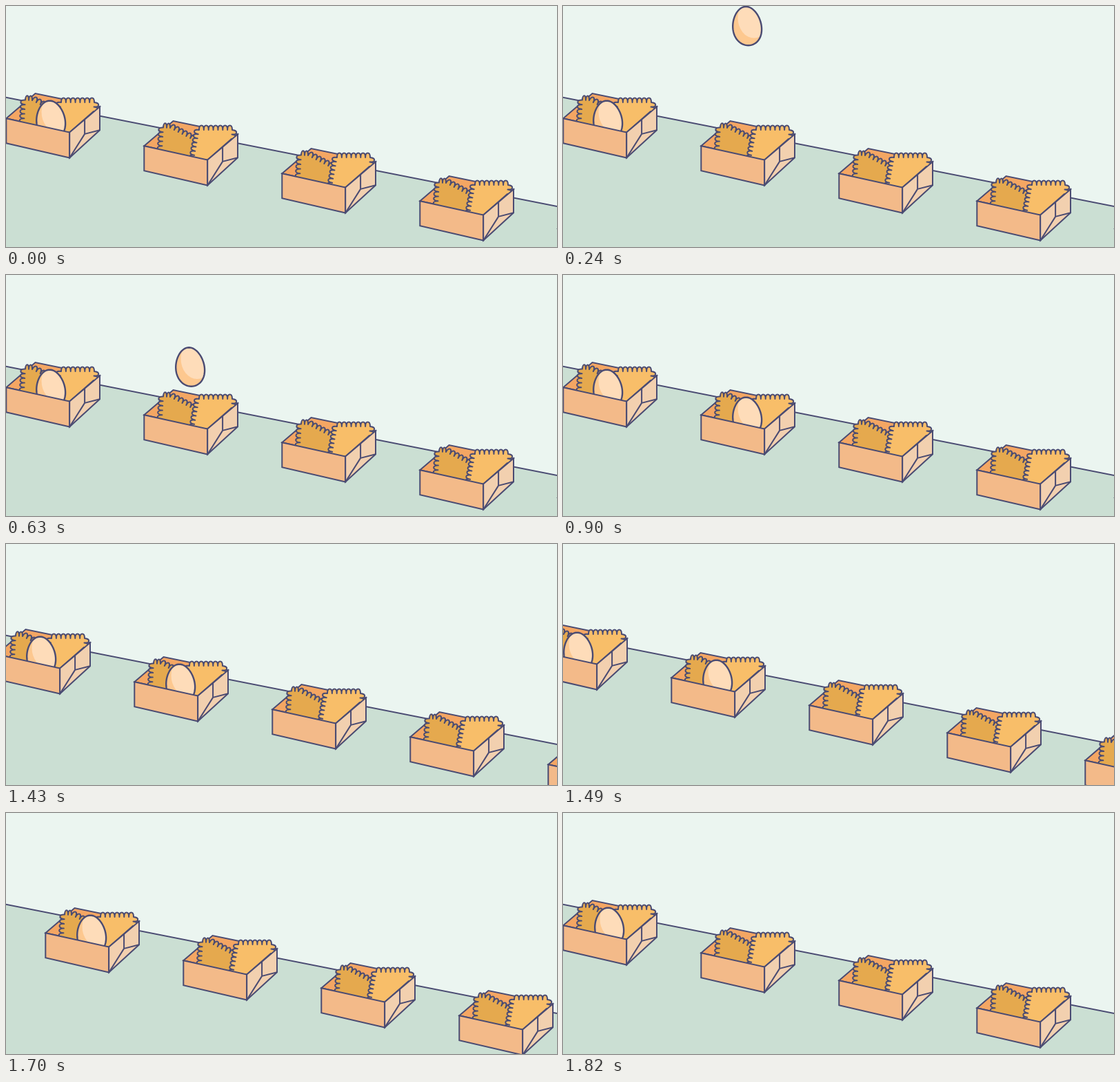
Animation, 799 px wide and 350 px high, one loop 1.85 s. Source, as an HTML page with a canvas:

```html
<!DOCTYPE html>
<html lang="en">
<head>
<meta charset="utf-8">
<title>Egg packing line</title>
<style>
  html, body { margin: 0; width: 100%; height: 100%; overflow: hidden; background: #ebf5f0; }
  canvas { display: block; }
</style>
</head>
<body>
<canvas id="stage" width="799" height="350"></canvas>
<script>
const ctx = document.getElementById('stage').getContext('2d');
const INK = '#4a4b72';
const LOOP = 1850, STEP = 30;
const FALL_STEPS = 30, FALL_HEIGHT = 241;
const SLIDE_START = 1400, SLIDE_STEPS = 14;
const PITCH_X = 200, PITCH_Y = 40;
const REST_Y = 165.8;   // egg centre inside a box
const BUMP = 6.5;       // size of one paper scallop

const polygon = (...points) =>
  new Path2D('M' + points.map(p => p.join()).join('L') + 'Z');

const below = ([x, y], drop) => [x, y + drop];

// Paper sheet with scallops along all edges but the two that meet at the last point.
function ruffle(points, corner) {
  const path = new Path2D();
  path.moveTo(...points[0]);
  for (let i = 1; i < points.length; i++) {
    let [x, y] = points[i - 1];
    const spanX = points[i][0] - x, spanY = points[i][1] - y;
    const length = Math.hypot(spanX, spanY);
    const count = Math.round(length / BUMP);
    const dx = spanX / count, dy = spanY / count;
    const outX = spanY / length * BUMP * 1.33, outY = -spanX / length * BUMP * 1.33;
    for (let n = 0; n < count; n++, x += dx, y += dy) {
      path.bezierCurveTo(x + outX, y + outY, x + outX + dx, y + outY + dy, x + dx, y + dy);
    }
  }
  path.lineTo(...corner);
  path.closePath();
  return path;
}

// An ellipse that narrows towards the top and leans slightly.
function eggShape() {
  const points = [];
  for (let a = 0; a < 2 * Math.PI; a += Math.PI / 30) {
    const y = -28.2 * Math.cos(a);
    points.push([20.8 * Math.sin(a) * (1 - 0.1 * Math.cos(a)) + 0.06 * y, y]);
  }
  return polygon(...points);
}

const left = [0.3, 163.3], back = [42.5, 127], right = [136, 146.3], near = [92.2, 183.5];
const nearFoot = below(near, 37), rightFoot = below(right, 34);
const foldTop = [(near[0] + right[0]) / 2, (near[1] + right[1]) / 2];
const foldEnd = below(foldTop, 21);

const inside = polygon(left, back, right, near);
const front = polygon(left, below(left, 36), nearFoot, near);
const side = polygon(near, right, rightFoot, nearFoot);
const folds = new Path2D(`M${foldTop}L${foldEnd}L${rightFoot}M${foldEnd}L${nearFoot}`);
const backPaper = ruffle([[26, 170], [28, 136.5], [38, 137], [73, 155]], [70, 186]);
const frontPaper = ruffle([[72, 183], [80, 140], [128, 140], [127, 153]], near);
const shell = eggShape();
const shine = new Path2D();
shine.ellipse(10, -12, 23.5, 29.5, 0, 0, 2 * Math.PI);

function draw(path, fill, width = 2, join = 'miter') {
  if (fill) {
    ctx.fillStyle = fill;
    ctx.fill(path);
  }
  ctx.strokeStyle = INK;
  ctx.lineWidth = width;
  ctx.lineJoin = join;
  ctx.stroke(path);
}

function drawEgg({ x, y }) {
  ctx.save();
  ctx.translate(x, y);
  ctx.fillStyle = '#fdc88f';
  ctx.fill(shell);
  ctx.save();
  ctx.clip(shell);
  ctx.fillStyle = '#fedcb9';
  ctx.fill(shine);
  ctx.restore();
  draw(shell, null, 2.4);
  ctx.restore();
}

function drawBox(x, y, egg) {
  ctx.save();
  ctx.translate(x, y);
  draw(inside, '#f4a663');
  draw(backPaper, '#e5a94e', 2, 'round');
  draw(frontPaper, '#f8be69', 2, 'round');
  if (egg) drawEgg(egg);
  draw(front, '#f3ba89');
  draw(side, '#f2d0af');
  draw(folds, null, 2, 'round');
  ctx.restore();
}

function drawBackground() {
  ctx.fillStyle = '#ebf5f0';
  ctx.fillRect(0, 0, 799, 350);
  draw(polygon([-5, 131.8], [805, 292.2], [805, 360], [-5, 360]), '#cbdfd3');
}

function render(time) {
  const fall = Math.min(1, Math.floor(time / STEP) / FALL_STEPS);
  const slide = Math.max(0, Math.floor((time - SLIDE_START) / STEP) / SLIDE_STEPS);
  const eggs = [
    { x: 65, y: REST_Y },
    { x: 67, y: REST_Y - FALL_HEIGHT * (1 - fall) }
  ];
  drawBackground();
  for (let i = 0; i < 5; i++) {
    const place = i - slide;
    drawBox(Math.round(place * PITCH_X), Math.round(place * PITCH_Y), eggs[i]);
  }
}

const startTime = performance.now();
function tick() {
  render((performance.now() - startTime) % LOOP);
  requestAnimationFrame(tick);
}
tick();
</script>
</body>
</html>
```
